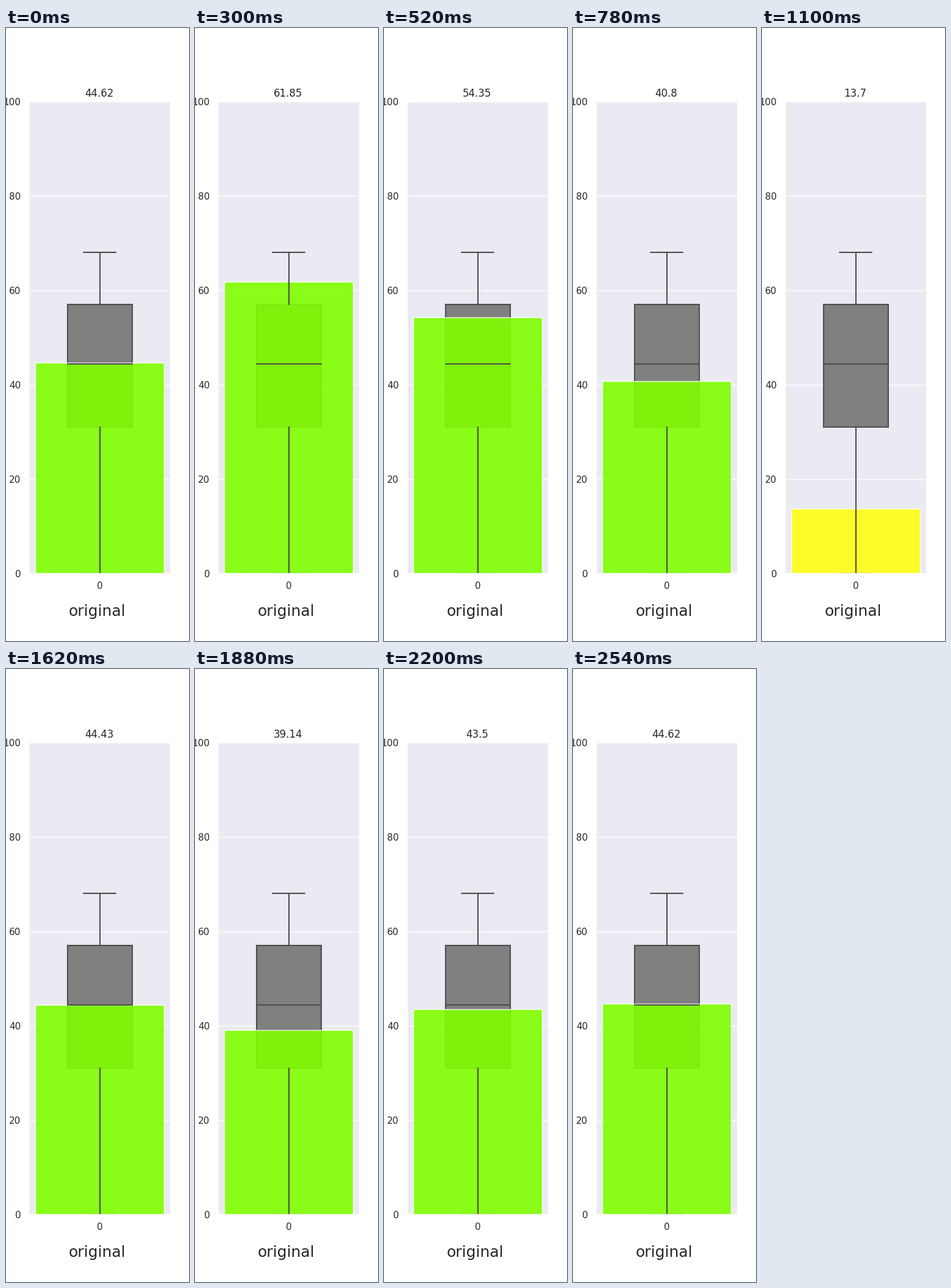
Recreate the animation shown at these times as a matplotlib script. Size 300x1000 px, loop 2560 ms.

```python
import numpy as np
import matplotlib.pyplot as plt
from matplotlib.animation import FuncAnimation
from matplotlib.patches import Rectangle
from matplotlib.transforms import ScaledTranslation

STEP_MS = 20
LOOP_MS = 2560
INK = "#262626"
LINE = "#4d4d4d"

# Boxplot statistics
LOW, Q1, MEDIAN, Q3, HIGH = 0, 31, 44.43, 57, 68

# Turning points of the bar; it moves at constant speed between them
START, PLATEAU = 44.62, 54.35
TURNS = {
    0: START, 407: HIGH, 520: PLATEAU, 620: PLATEAU, 1261.8: LOW,
    1620: MEDIAN, 1720: MEDIAN, 1880: 39.14, 2000: 27, 2400: 60, 2540: START,
}

plt.rcParams.update({
    "font.family": "DejaVu Sans",
    "text.color": INK,
    "lines.solid_capstyle": "round",
    "xtick.major.size": 6, "ytick.major.size": 6,
    "xtick.bottom": False, "ytick.left": False,
    "xtick.labelsize": 11, "ytick.labelsize": 11,
    "xtick.color": INK, "ytick.color": INK,
    "axes.facecolor": "#eaeaf2", "axes.edgecolor": "white",
    "axes.linewidth": 1.25, "axes.axisbelow": True,
    "grid.color": "white", "grid.linewidth": 1,
})


def value_at(ms):
    return float(np.interp(ms, list(TURNS), list(TURNS.values())))


def bar_color(value):
    return "#7fff00" if value >= 30 else "#ffff14"


def line(xs, ys):
    ax.plot(xs, ys, color=LINE, lw=1.5)


def draw_boxplot(width=0.4):
    ax.add_patch(Rectangle((-width / 2, Q1), width, Q3 - Q1,
                           facecolor="#808080", edgecolor=LINE, lw=1.5))
    for quartile, end in ((Q1, LOW), (Q3, HIGH)):
        line((0, 0), (quartile, end))
        line((-width / 4, width / 4), (end, end))
    line((-width / 2, width / 2), (MEDIAN, MEDIAN))


def nudge_left(text, pixels=1):
    shift = ScaledTranslation(-pixels / fig.dpi, 0, fig.dpi_scale_trans)
    text.set_transform(text.get_transform() + shift)


fig = plt.figure(figsize=(3, 10), dpi=100, facecolor="white")
ax = fig.add_axes([0.125, 0.11, 0.775, 0.77])
draw_boxplot()
bar = ax.bar(0, 0, width=0.8, alpha=0.9, edgecolor="white", linewidth=1)[0]
ax.set_xlim(-0.44, 0.44)
ax.set_ylim(0, 100)
ax.set_xticks([0])
ax.set_yticks(range(0, 101, 20))
ax.grid(axis="y")
title = ax.set_title("", fontsize=12)
caption = fig.suptitle("original", fontsize=18, y=0.06)
for text in (title, caption):
    nudge_left(text)


def update(frame):
    value = value_at(frame * STEP_MS)
    bar.set_height(value)
    bar.set_facecolor(bar_color(value))
    title.set_text(str(round(value, 2)))
    return bar, title


anim = FuncAnimation(fig, update, frames=LOOP_MS // STEP_MS, interval=STEP_MS,
                     init_func=lambda: update(0), repeat=True, blit=False)
plt.show()
```
